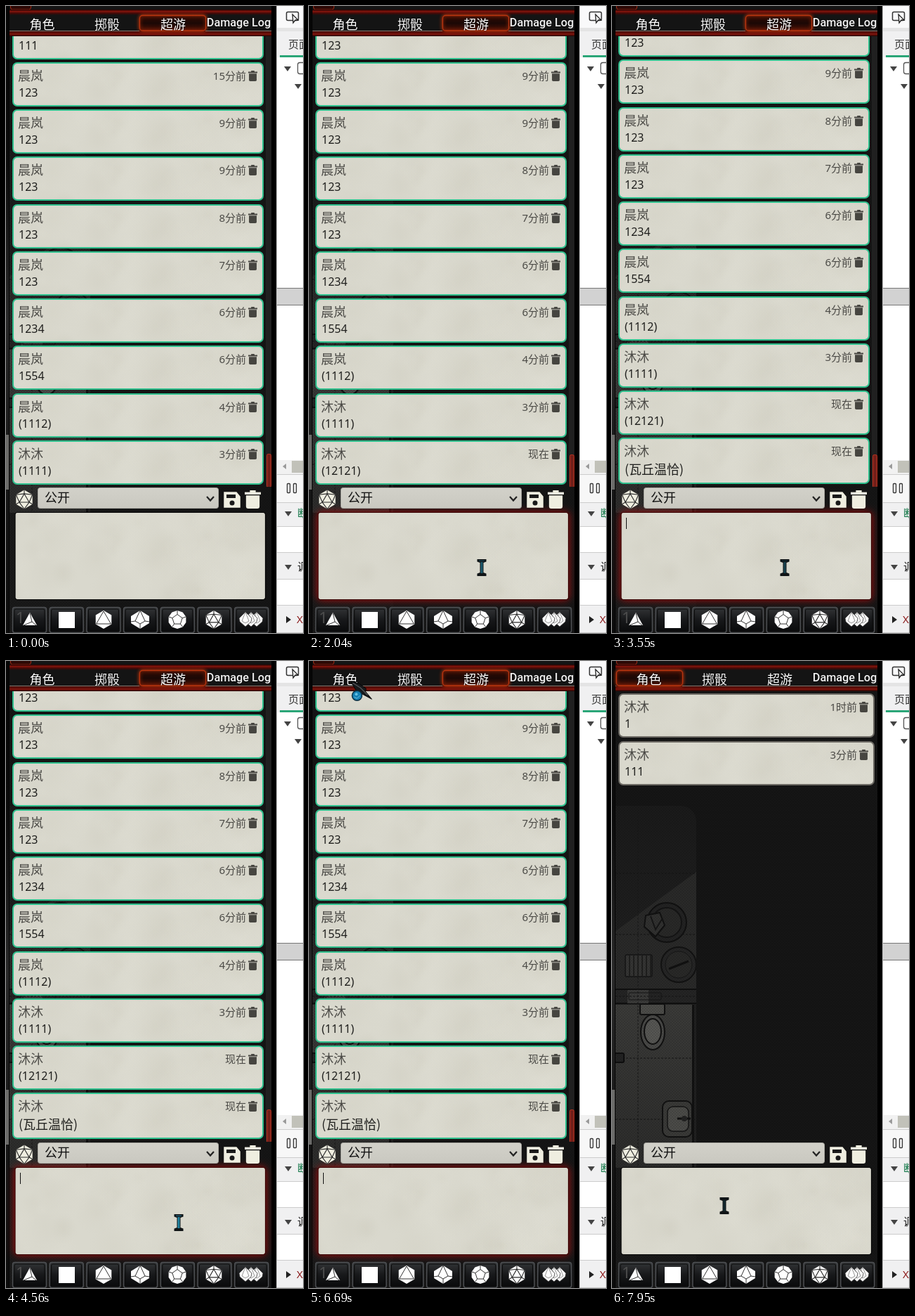
Recreate the animation shown at these times as an HTML page with a canvas. Size 423x892 px, loop 8000 ms.

```html
<!DOCTYPE html>
<html lang="zh">
<head>
<meta charset="utf-8">
<title>Chat panel</title>
<style>
html, body { margin: 0; width: 100%; height: 100%; overflow: hidden; background: #000; }
canvas { display: block; width: 423px; height: 892px; }
</style>
</head>
<body>
<canvas id="stage" width="423" height="892"></canvas>
<script>
const W = 423, H = 892, LOOP = 8000;
const ctx = document.getElementById('stage').getContext('2d');
const CJK = '"Noto Sans CJK SC", "Noto Sans CJK", sans-serif';
const SANS = '"Noto Sans", ' + CJK;
const CREAM = '#efeee0';

let seed = 7;
const rnd = () => (seed = seed * 16807 % 2147483647) / 2147483647;

function layer(w, h, paint) {
  const c = document.createElement('canvas');
  c.width = w; c.height = h;
  paint(c.getContext('2d'));
  return c;
}
function rect(g, x, y, w, h, fill) { g.fillStyle = fill; g.fillRect(x, y, w, h); }
function ink(g, fill, stroke, lw) {
  if (fill) { g.fillStyle = fill; g.fill(); }
  if (stroke) { g.strokeStyle = stroke; g.lineWidth = lw; g.stroke(); }
}
function box(g, x, y, w, h, r, fill, stroke, lw = 1) {
  g.beginPath(); g.roundRect(x, y, w, h, r);
  ink(g, fill, stroke, lw);
}
function poly(g, pts, fill, stroke, lw = 1) {
  g.beginPath();
  pts.forEach(([x, y]) => g.lineTo(x, y));
  g.closePath();
  ink(g, fill, stroke, lw);
}
function disc(g, x, y, r, fill, stroke, lw = 1) {
  g.beginPath(); g.arc(x, y, r, 0, 7);
  ink(g, fill, stroke, lw);
}
function oval(g, x, y, rx, ry, fill, stroke, lw = 1) {
  g.beginPath(); g.ellipse(x, y, rx, ry, 0, 0, 7);
  ink(g, fill, stroke, lw);
}
function line(g, pts, stroke, lw = 1) {
  g.beginPath();
  pts.forEach(([x, y]) => g.lineTo(x, y));
  ink(g, null, stroke, lw);
}
function text(g, s, x, y, font, fill, align = 'left') {
  g.font = font; g.fillStyle = fill; g.textAlign = align; g.fillText(s, x, y);
}
function fade(g, y0, y1, ...colors) {
  const f = g.createLinearGradient(0, y0, 0, y1);
  colors.forEach((c, i) => f.addColorStop(i / (colors.length - 1), c));
  return f;
}
const ngon = (n, x, y, r) => Array.from({ length: n }, (_, i) => {
  const a = i * 2 * Math.PI / n - Math.PI / 2;
  return [x + r * Math.cos(a), y + r * Math.sin(a)];
});

const paper = layer(366, 126, g => {
  rect(g, 0, 0, 366, 126, '#d9d8cd');
  for (let i = 0; i < 110; i++) {
    const x = rnd() * 366, y = rnd() * 126, r = 10 + rnd() * 34;
    const c = rnd() < 0.5 ? '196,193,178' : '230,229,219';
    const f = g.createRadialGradient(x, y, 0, x, y, r);
    f.addColorStop(0, `rgba(${c},.12)`);
    f.addColorStop(1, `rgba(${c},0)`);
    rect(g, x - r, y - r, 2 * r, 2 * r, f);
  }
});

function paintMap(g) {
  g.save();
  g.beginPath(); g.roundRect(-20, 206, 140, 720, 22); g.clip();
  rect(g, 0, 200, 122, 700, fade(g, 206, 470, '#1a1a1a', '#202020'));
  poly(g, [[0, 388], [120, 300], [120, 470], [0, 470]], '#292928');
  rect(g, 0, 466, 120, 22, '#242424');
  line(g, [[0, 467], [120, 467]], '#101010', 2);
  line(g, [[0, 487], [120, 487]], '#101010', 2);
  rect(g, 5, 489, 109, 232, fade(g, 489, 720, '#3a3a38', '#2b2b2a'));
  rect(g, 114, 489, 3, 232, '#111');
  rect(g, 5, 721, 115, 171, '#191919');
  rect(g, 22, 468, 30, 19, '#393938');
  box(g, 24, 472, 46, 10, 1, null, '#151515');
  g.setLineDash([3, 2]);
  for (const y of [302, 389, 477, 565, 652]) line(g, [[0, y], [118, y]], '#151515');
  line(g, [[37, 215], [37, 720]], '#181818');
  g.setLineDash([]);
  // furniture
  disc(g, 78, 372, 28, '#222', '#111', 2);
  disc(g, 78, 372, 21, '#282827', '#141414', 2);
  poly(g, [[48, 362], [68, 358], [75, 376], [62, 392], [46, 378]], '#30302f', '#111', 2);
  line(g, [[55, 363], [62, 382], [72, 366]], '#161616', 2);
  disc(g, 95, 432, 25, '#252525', '#121212', 2);
  disc(g, 95, 432, 19, '#282827', '#161616');
  line(g, [[81, 438], [109, 427]], '#111', 3);
  box(g, 19, 418, 38, 31, 2, '#343433', '#151515', 1.5);
  for (let x = 25; x < 56; x += 6) line(g, [[x, 419], [x, 448]], '#191919', 1.5);
  // bathroom
  box(g, 40, 488, 35, 15, 2, '#4b4b48', '#111', 2);
  oval(g, 58, 528, 17, 25, '#484846', '#111', 2);
  oval(g, 58, 527, 12, 18, '#555552', '#111', 2);
  box(g, 72, 626, 42, 51, 9, '#393937', '#111', 2);
  box(g, 79, 634, 30, 35, 8, '#4a4a47', '#151515', 1.5);
  line(g, [[93, 651], [112, 651]], '#111', 3);
  disc(g, 103, 651, 4, '#222');
  box(g, 4, 558, 13, 13, 2, '#222', '#0e0e0e', 2);
  g.restore();
}

function paintDevtools(g) {
  rect(g, 385, 0, 38, H, '#fff');
  rect(g, 385, 0, 38, 31, '#f9f9fa');
  rect(g, 385, 31, 38, 5, '#e4e4e4');
  rect(g, 385, 36, 38, 37, '#f0f0f1');
  rect(g, 390, 70, 33, 3, '#2ba678');
  box(g, 399.5, 8.5, 17, 12, 2, null, '#333', 1.5);
  poly(g, [[408, 12], [416, 20], [412, 20], [409, 24]], '#fff', '#222', 1.3);
  text(g, '页面', 402, 60, '15px ' + CJK, '#333');
  const down = (x, y) => poly(g, [[x - 5, y - 3], [x + 5, y - 3], [x, y + 4]], '#444');
  down(401, 89); down(416, 114);
  box(g, 415.5, 80.5, 14, 16, 3, '#fff', '#555', 1.3);
  rect(g, 385, 401, 38, 25, '#d2d2d2');
  rect(g, 385, 401, 38, 1, '#777'); rect(g, 385, 425, 38, 1, '#777');
  rect(g, 385, 646, 38, 20, '#f1f1f1');
  rect(g, 407, 647, 16, 17, '#c1c1b9');
  poly(g, [[394, 655], [399, 651], [399, 659]], '#999');
  rect(g, 385, 666, 38, 40, '#f7f7f7');
  rect(g, 385, 666, 38, 1, '#ccc');
  box(g, 400.5, 679.5, 4, 13, 1, null, '#333', 1.3);
  box(g, 409.5, 679.5, 4, 13, 1, null, '#333', 1.3);
  [[706, 35], [777, 39], [852, 40]].forEach(([y, h]) => {
    rect(g, 385, y, 38, h, '#f0f0f1');
    rect(g, 385, y, 38, 1, '#ccc'); rect(g, 385, y + h - 1, 38, 1, '#ccc');
  });
  down(402, 722); down(402, 798);
  poly(g, [[399, 868], [399, 878], [406, 873]], '#222');
  text(g, '断', 415, 727, '15px ' + CJK, '#08713f');
  text(g, '调', 415, 803, '15px ' + CJK, '#222');
  text(g, 'X', 414, 878, '15px ' + SANS, '#8c1d1d');
  rect(g, 385, 0, 1, H, '#bbb');
}

function d20(g, x, y, r, fill) {
  const o = ngon(6, x, y, r), t = ngon(3, x, y, r * 0.6);
  poly(g, o, fill);
  poly(g, t, null, '#2a2a2a', 1.1);
  t.forEach((p, i) => [-1, 0, 1].forEach(k => line(g, [p, o[(i * 2 + k + 6) % 6]], '#2a2a2a', 1.1)));
}
function trash(g, x, y, w, h, fill) {
  rect(g, x, y + h * .1, w, h * .13, fill);
  rect(g, x + w * .32, y, w * .36, h * .14, fill);
  box(g, x + w * .08, y + h * .28, w * .84, h * .72, [0, 0, w * .14, w * .14], fill);
}

function paintDice(g) {
  for (let i = 0; i < 7; i++) {
    const x = 9.5 + i * 52.7;
    box(g, x, 855.5, 48, 36, 3, fade(g, 855, 892, '#343638', '#17181a', '#08090a'), '#4d4f52', 1.5);
    box(g, x + 2.5, 858, 43, 31, 2, null, '#0c0c0c');
  }
  text(g, '1', 14, 878, '22px ' + SANS, '#4d4d4d');
  const edge = '#333', cy = 873;
  poly(g, [[34, 863], [44, 881], [24, 881]], '#fff');
  line(g, [[34, 864], [37, 876], [43, 881]], edge);
  line(g, [[37, 876], [25, 881]], edge);
  rect(g, 75, 862, 23, 23, '#fff');
  poly(g, ngon(6, 139, cy, 13), '#fff');
  poly(g, ngon(3, 139, cy, 12), null, edge);
  poly(g, [[191, 860], [204, 868], [204, 878], [191, 886], [178, 878], [178, 868]], '#fff');
  line(g, [[191, 860], [184, 875], [191, 879], [198, 875], [191, 860]], edge);
  line(g, [[178, 876], [184, 875]], edge); line(g, [[198, 875], [204, 876]], edge);
  line(g, [[191, 879], [191, 886]], edge);
  const o = ngon(10, 244, cy, 13), q = ngon(5, 244, cy, 7.5);
  poly(g, o, '#fff'); poly(g, q, null, edge);
  q.forEach((p, i) => line(g, [p, o[i * 2]], edge));
  d20(g, 296, cy, 13, '#fff');
  for (const x of [357, 349, 341]) {
    poly(g, [[x, 862], [x + 9, 871], [x + 8, 876], [x, 883], [x - 8, 876], [x - 9, 871]], '#fff', edge, .8);
    line(g, [[x, 862], [x - 5, 875], [x, 878], [x + 5, 875], [x, 862]], '#777', .8);
  }
}

const backdrop = layer(W, H, g => {
  rect(g, 0, 0, W, H, '#000');
  rect(g, 5, 0, 373, H, '#151515');
  paintMap(g);
  // fine weave
  g.fillStyle = 'rgba(0,0,0,.16)';
  for (let y = 0; y < H; y += 2) for (let x = 5 + y % 4; x < 378; x += 4) g.fillRect(x, y, 2, 1);
  rect(g, 0, 0, 5, H, fade(g, 0, H, '#050505', '#0b0b0b', '#292929', '#161616', '#0b0b0b'));
  rect(g, 0, 610, 4, 78, '#6b6b69');
  rect(g, 4, 0, 1, H, '#050505');
  paintDevtools(g);
});

const controls = layer(W, H, g => {
  d20(g, 26, 702, 13.5, CREAM);
  box(g, 45.5, 685.5, 257, 29, 3, fade(g, 686, 715, '#d2d1c9', '#c9c8c0'), '#aaa9a2');
  text(g, '公开', 55, 706, '18px ' + CJK, '#111');
  line(g, [[286, 698], [291, 703.5], [296, 698]], '#222', 2.2);
  poly(g, [[311, 692], [328, 692], [333, 698], [333, 713], [311, 713]], CREAM, CREAM, 1.5);
  rect(g, 314, 695, 13, 5, '#1a1a1a');
  disc(g, 322, 707, 3.5, '#1a1a1a');
  trash(g, 340, 689, 23, 26, CREAM);
  paintDice(g);
});

const A = '晨岚', B = '沐沐', NAME = '瓦丘温恰';
const log = [
  [A, '111', '15分前'], [A, '123', '15分前'], [A, '123', '9分前'], [A, '123', '9分前'],
  [A, '123', '8分前'], [A, '123', '7分前'], [A, '1234', '6分前'], [A, '1554', '6分前'],
  [A, '(1112)', '4分前'], [B, '(1111)', '3分前'], [B, '(12121)', '现在'], [B, `(${NAME})`, '现在']
];

function card(y, [name, msg, time], w, edge) {
  const wide = msg.includes(NAME), h = wide ? 64 : 61, g = ctx;
  g.save();
  box(g, 10, y + 1, w, h, 6); g.clip();
  g.drawImage(paper, 0, 20, 366, 70, 9, y, 366, 70);
  g.restore();
  box(g, 10, y + 1, w, h, 6, null, edge, 2);
  const right = w + 10;
  text(g, name, 17, y + 26, '18px ' + CJK, '#4b4a46');
  text(g, msg, 18, y + (wide ? 52 : 49), wide ? '18px ' + CJK : '500 16px ' + SANS, '#20201e');
  text(g, time, right - 24, y + 25, '15px ' + SANS, '#4b4a46', 'right');
  trash(g, right - 21, y + 12, 13, 15, '#464540');
}

function drawList(t) {
  ctx.save();
  ctx.beginPath(); ctx.rect(5, 43, 373, 641); ctx.clip();
  if (t >= 7530) {
    card(46, [B, '1', '1时前'], 363, '#6c6963');
    card(114, [B, '111', '3分前'], 363, '#6c6963');
  } else {
    const first = t < 1770 ? 0 : t < 3410 ? 1 : 2;
    const top = first === 2 ? 9 : 12.5;
    for (let i = 0; i < 10; i++) card(Math.round(top + i * 67.25), log[first + i], 356, '#2ec08d');
    rect(ctx, 370, 43, 8, 641, '#202020');
    box(ctx, 371.5, first ? 638.5 : 637.5, 6, 47, 2, '#74201a', '#b8321f');
  }
  ctx.restore();
}

function drawHeader(t) {
  const g = ctx, alt = t >= 7530;
  rect(g, 5, 0, 373, 43, '#141414');
  box(g, 6.5, -8, 29, 13, 3, '#2c0805', '#a02a14');
  rect(g, 5, 5, 373, 8, fade(g, 5, 13, '#1a0302', '#85150d', '#430907', '#141414'));
  rect(g, 5, 35, 373, 8, fade(g, 35, 43, '#2b0907', '#5b0d08', '#7d140c', '#1c0403'));
  const x = alt ? 6 : 190;
  rect(g, 5, 35, x - 5, 1, '#83766e');
  rect(g, x + 94, 35, 284 - x, 1, '#83766e');
  g.save();
  g.shadowColor = '#d33a0c'; g.shadowBlur = 5;
  box(g, x + .5, 13.5, 94, 21.5, 4, fade(g, 13, 36, '#330c05', '#1b0805', '#501206'), '#b8340f', 1.3);
  g.restore();
  g.save();
  g.shadowColor = '#000'; g.shadowBlur = 3;
  const f = '18px ' + CJK;
  text(g, '角色', alt ? 52.5 : 51.5, 33, f, '#fff', 'center');
  text(g, '掷骰', alt ? 146 : 144, 33, f, '#f0f0f0', 'center');
  text(g, '超游', alt ? 239 : 238, 33, f, '#fff', 'center');
  text(g, 'Damage Log', 331.5, 29, '500 16.2px Roboto, sans-serif', '#f2f2f2', 'center');
  g.restore();
}

const typing = [[870, '1'], [940, '12'], [1150, '121'], [1290, '1212'], [1430, '12121'], [1770, '']];
const pinyin = [[2300, 'w'], [2440, "w'q"], [2580, "w'q'w"], [2790, "w'q'w'q"], [3210, '']];
const choices = {
  "w": ['我', '为', '问', '无', '万'],
  "w'q": ['我去', '武器', '无情', '完全', '玩去'],
  "w'q'w": ['万千瓦', '问问', '我去玩', '五千万'],
  "w'q'w'q": [NAME, '我去问清', '完全无情']
};
const latest = (steps, t) => steps.reduce((v, [at, s]) => t >= at ? s : v, '');

function typedText(t) {
  if (t < 2000) return latest(typing, t);
  if (t >= 3410) return '';
  if (t >= 3210) return NAME;
  return latest(pinyin, t - 100).replaceAll("'", '');
}

function drawInput(t) {
  const g = ctx, focus = t >= 400 && t < 7320;
  if (focus) {
    g.save();
    g.shadowColor = '#b00c0c'; g.shadowBlur = 12;
    box(g, 12.5, 720.5, 357, 124, 3, '#7a0b0b');
    g.restore();
  }
  g.save();
  box(g, 13, 721, 356, 123, 2); g.clip();
  g.drawImage(paper, 8, 719);
  g.restore();
  box(g, 13, 720.5, 356.5, 124, 3, null, focus ? '#3a0505' : '#080808', 1.2);
  if (!focus) return;
  const s = typedText(t);
  text(g, s, 20, 741, s === NAME ? '16px ' + CJK : '14px "Liberation Mono", monospace', '#161616');
  const busy = t > 870 && t < 1500 || t > 2300 && t < 3410;
  if (busy || (t + 800) % 1000 < 500) rect(g, 20 + Math.round(g.measureText(s).width), 728, 1, 16, '#111');
}

function drawIme(t) {
  const s = latest(pinyin, t), g = ctx;
  if (!s) return;
  g.save();
  g.shadowColor = 'rgba(0,0,0,.6)'; g.shadowBlur = 7;
  box(g, 27, 749, 430, 106, 7, '#333334');
  g.restore();
  rect(g, 38, 803, 385, 52, '#474748');
  text(g, s, 57, 787, '21px ' + SANS, '#fff');
  rect(g, 58 + g.measureText(s).width, 766, 1.2, 26, '#fff');
  g.save();
  g.letterSpacing = '-1.2px';
  let x = 55;
  choices[s].forEach((c, i) => {
    const label = `${i + 1}.${c}`;
    text(g, label, x, 832, '21.5px ' + CJK, '#fff');
    x += g.measureText(label).width + 20;
    if (c === '问问') {
      disc(g, x - 11, 819, 6, null, '#ddd', 1.2);
      line(g, [[x - 14, 819], [x - 12, 821.5], [x - 7, 816]], '#ddd', 1.2);
      x += 19;
    }
  });
  g.restore();
}

const path = [
  [120, 300, 850], [330, 246, 799], [4900, 246, 799], [5020, 219, 750], [5400, 140, 300],
  [5700, 90, 40], [5790, 83, 26], [5930, 85, 27], [6250, 134, 30], [6650, 62, 30],
  [6760, 55, 28], [7460, 55, 28], [7530, 71, 67], [7700, 165, 420], [7880, 160, 775], [8001, 160, 775]
];
function pointerAt(t) {
  const i = path.findIndex(p => t < p[0]);
  const [t0, x0, y0] = path[i - 1], [t1, x1, y1] = path[i];
  const k = (t - t0) / (t1 - t0);
  return [x0 + (x1 - x0) * k, y0 + (y1 - y0) * k];
}

function drawPointer(t) {
  if (t < 120) return;
  const g = ctx, [x, y] = pointerAt(t);
  const at = pts => pts.map(([a, b]) => [x + a, y + b]);
  if (t >= 400 && t < 560 || t >= 7320 && t < 7500) disc(g, x, y, 15, 'rgba(222,204,0,.68)');
  if (x < 369 && y > 721 && y < 844) {
    const glow = .5 - .5 * Math.cos((t - 1010) / 1400 * 2 * Math.PI);
    poly(g, at([
      [-6.5, -12], [6.5, -12], [6.5, -8.5], [2.5, -7], [2.5, 7], [6.5, 8.5],
      [6.5, 12], [-6.5, 12], [-6.5, 8.5], [-2.5, 7], [-2.5, -7], [-6.5, -8.5]
    ]), '#101416');
    rect(g, x - 1.5, y - 8, 3, 16, `rgba(35,135,165,${.15 + .85 * glow})`);
    rect(g, x - 4, y - 10.5, 8, 1.5, `rgba(35,120,150,${.7 * glow})`);
  } else {
    poly(g, at([[0, 0], [12, 3], [22, 10], [21, 14], [30, 25], [17, 18], [14, 21], [8, 13]]), '#17191b', '#050505');
    line(g, at([[3, 2], [14, 9], [24, 19]]), '#54585b', 1.3);
    disc(g, x + 9, y + 20, 7, '#1580b4', '#0c2f42', 1.5);
    disc(g, x + 8, y + 18, 2, '#62bfe2');
    line(g, at([[5, 22], [9, 24], [13, 20]]), '#6fbfdd');
  }
}

const start = performance.now();
function frame() {
  const t = (performance.now() - start) % LOOP;
  ctx.drawImage(backdrop, 0, 0);
  drawList(t);
  drawHeader(t);
  drawInput(t);
  ctx.drawImage(controls, 0, 0);
  drawIme(t);
  drawPointer(t);
  requestAnimationFrame(frame);
}
requestAnimationFrame(frame);
</script>
</body>
</html>
```
